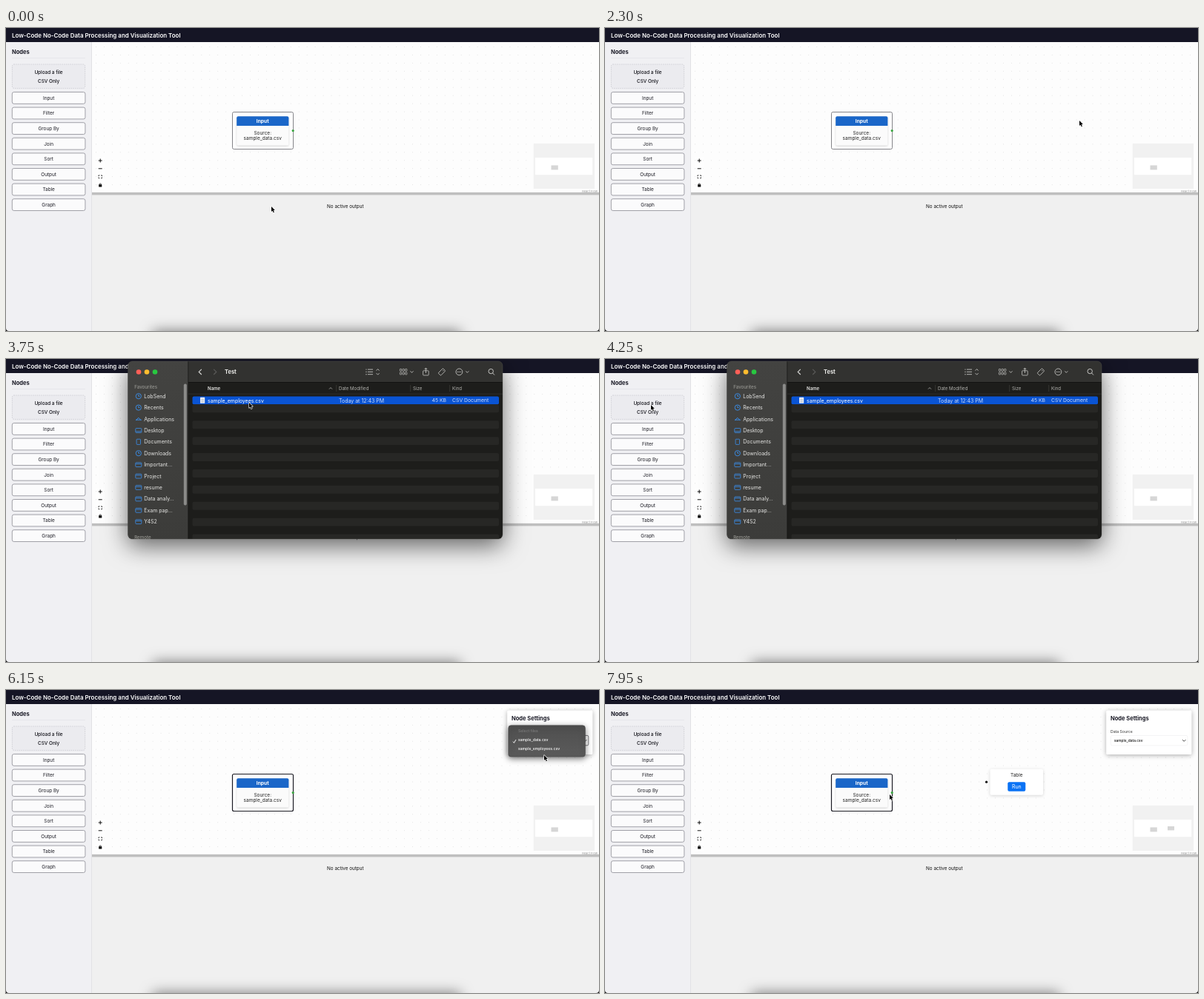
An HTML page with a canvas that plays this animation: 800 by 409 pixels, repeating every 8000 ms.

```html
<!DOCTYPE html>
<html lang="en">
<head>
<meta charset="utf-8">
<title>Data tool</title>
<style>
html, body { margin: 0; width: 100%; height: 100%; overflow: hidden; background: #000; }
canvas { display: block; width: 800px; height: 409px; }
</style>
</head>
<body>
<canvas id="stage"></canvas>
<script>
const W = 800, H = 409, LOOP = 8000, STEP = 50, GLIDE = 350;
const canvas = document.getElementById('stage');
const dpr = window.devicePixelRatio || 1;
canvas.width = Math.round(W * dpr);
canvas.height = Math.round(H * dpr);
const c = canvas.getContext('2d');

const SPOT = {
  rest: [358, 241], node: [352, 148], option: [738, 66], pane: [640, 125],
  dock: [213, 411], file: [328, 59], upload: [62, 62], close: [178, 16],
  below: [368, 167], menuEnd: [726, 88], tableButton: [57, 217],
  drop: [519, 107], handle: [384, 141]
};
// When the pointer sets off, and where to
const MOVES = [
  [0, 'node'], [500, 'option'], [1750, 'pane'], [2700, 'dock'], [3350, 'file'],
  [3850, 'upload'], [4250, 'close'], [4500, 'below'], [4800, 'node'], [5000, 'option'],
  [5750, 'menuEnd'], [6500, 'tableButton'], [7100, 'drop'], [7600, 'handle']
];
const within = (t, a, b) => t >= a && t < b;
const clamp = p => Math.max(0, Math.min(1, p));
const ease = p => p * p * (3 - 2 * p);
const progress = (t, start, span) => ease(clamp((t - start) / span));

function pointer(t) {
  let [x, y] = SPOT.rest;
  MOVES.forEach(([start, name], i) => {
    const next = i + 1 < MOVES.length ? MOVES[i + 1][0] : LOOP;
    const p = progress(t, start, Math.min(GLIDE, next - start));
    x += (SPOT[name][0] - x) * p;
    y += (SPOT[name][1] - y) * p;
  });
  return { x, y };
}

function text(s, x, y, size, color, weight = 400, align = 'left') {
  c.font = `${weight} ${size}px Inter, sans-serif`;
  c.textAlign = align;
  c.fillStyle = color;
  c.fillText(s, x, y + size * 0.36);
}
function rect(x, y, w, h, color) {
  c.fillStyle = color;
  c.fillRect(x, y, w, h);
}
function box(x, y, w, h, r, fill, stroke, lw = 0.8) {
  c.beginPath();
  c.roundRect(x, y, w, h, r);
  if (fill) { c.fillStyle = fill; c.fill(); }
  if (stroke) { c.strokeStyle = stroke; c.lineWidth = lw; c.stroke(); }
}
function disc(x, y, r, fill) {
  c.beginPath();
  c.arc(x, y, r, 0, 7);
  c.fillStyle = fill;
  c.fill();
}
function ring(x, y, r, color, lw = 0.9) {
  c.beginPath();
  c.arc(x, y, r, 0, 7);
  c.strokeStyle = color;
  c.lineWidth = lw;
  c.stroke();
}
function line(color, lw, ...pts) {
  c.beginPath();
  for (let i = 0; i < pts.length; i += 2) c.lineTo(pts[i], pts[i + 1]);
  c.strokeStyle = color;
  c.lineWidth = lw;
  c.stroke();
}
// Chevron with its tip pointing along (dx, dy)
function chevron(x, y, dx, dy, r, color, lw = 0.9) {
  const px = dx * r / 2, py = dy * r / 2;
  line(color, lw, x - px - dy * r, y - py - dx * r, x + px, y + py, x - px + dy * r, y - py + dx * r);
}
function shaded(color, blur, dy, draw) {
  c.save();
  c.shadowColor = color;
  c.shadowBlur = blur * dpr;
  c.shadowOffsetY = dy * dpr;
  draw();
  c.restore();
}
function vertical(y0, y1, a, b) {
  const g = c.createLinearGradient(0, y0, 0, y1);
  g.addColorStop(0, a);
  g.addColorStop(1, b);
  return g;
}

function button(label, x, y) {
  box(x, y, 98.6, 15.8, 2.4, '#fbfbfc', '#8b8b93');
  text(label, x + 49.3, y + 8, 6.4, '#1c1c24', 400, 'center');
}

function sidebar() {
  rect(0, 19, 116, 390, '#f0f0f3');
  rect(115, 19, 1, 390, '#e2e2e5');
  text('Nodes', 8, 32, 7.5, '#1a1a26', 700);
  rect(8, 40.5, 99, 0.6, '#dfdfe4');
  c.setLineDash([1.6, 1.2]);
  box(8.4, 49, 98.2, 32.4, 2.4, '#ebebef', '#c4c4cc', 0.7);
  c.setLineDash([]);
  ['Upload a file', 'CSV Only'].forEach((s, i) =>
    text(s, 57.5, 60 + i * 11.2, 6.4, '#111118', 500, 'center'));
  ['Input', 'Filter', 'Group By', 'Join', 'Sort', 'Output', 'Table', 'Graph']
    .forEach((s, i) => button(s, 8.3, 86.5 + i * 20.6));
}

function controls() {
  const x = 127.2, k = '#111';
  rect(x - 5.2, 174, 10.4, 43.4, '#fefefe');
  for (const y of [179, 189.8]) line(k, 1, x - 2.5, y, x + 2.5, y);
  line(k, 1, x, 176.5, x, 181.5);
  for (const sx of [-1, 1]) for (const sy of [-1, 1]) {
    const ex = x + sx * 2.3, ey = 200.8 + sy * 1.9;
    line(k, 0.8, ex - sx * 1.4, ey, ex, ey, ex, ey - sy * 1.2);
  }
  box(x - 2.1, 211.3, 4.2, 3.3, 0.6, k);
  ring(x, 211.2, 1.3, k, 0.7);
}

function pane() {
  rect(116, 19, 684, 203, '#fdfdfd');
  const gap = 10.95;
  for (let x = 121; x < W; x += gap)
    for (let y = 25; y < 222; y += gap) rect(x, y, 0.9, 0.9, '#dfdfdf');
  controls();
}

function inputNode(bold) {
  const mid = 346.2;
  box(305.5, 113.5, 82, 50, 2, '#fff', bold ? '#1c1c24' : '#77777c', bold ? 1.2 : 0.9);
  shaded('rgba(0,0,0,.18)', 3, 1, () => box(311.2, 119.2, 70.2, 39.4, 2, '#fbfbfb'));
  box(311.2, 119.2, 70.2, 12.8, [2, 2, 0, 0], '#1a66c8');
  text('Input', mid, 126, 6.7, '#fff', 700, 'center');
  text('Source:', mid, 141.6, 6.5, '#222', 400, 'center');
  text('sample_data.csv', mid, 149, 6.5, '#222', 400, 'center');
  disc(387.2, 138.6, 1.6, '#35a23c');
}

function tableNode() {
  const mid = 555.3;
  shaded('rgba(0,0,0,.16)', 4, 1, () => box(519.5, 106.8, 71.5, 35, 2, '#fff'));
  text('Table', mid, 115, 6.4, '#222', 400, 'center');
  box(mid - 12, 124.2, 24, 12.6, 2, '#0a72f4');
  text('Run', mid, 130.5, 7, '#fff', 400, 'center');
  disc(514.6, 124.2, 1.6, '#111');
}

function minimap(hasTable) {
  rect(711.8, 155.8, 82.2, 61.2, '#f1f1f1');
  rect(713.8, 175, 77.4, 23.2, '#fff');
  rect(735.5, 185.4, 9.3, 6, '#d6d6d6');
  if (hasTable) rect(759, 184, 9, 5.4, '#d6d6d6');
  text('React Flow', 798, 220.4, 4, '#999', 400, 'right');
}

function settings(focused) {
  shaded('rgba(0,0,0,.32)', 6, 1.2, () => box(676.2, 27.6, 115.2, 59.4, 1.6, '#fff'));
  text('Node Settings', 682, 38.6, 7.5, '#1a1a26', 700);
  text('Data Source', 682, 56.3, 5.12, '#333');
  box(682.4, 61.4, 103.4, 13.4, 1.6, '#fff', focused ? '#55555c' : '#f1f1f3');
  text('sample_data.csv', 687, 68, 4.8, '#111', 500);
  chevron(781.2, 68.2, 0, 1, 2.2, '#333');
}

function menu(files, mouse) {
  const h = 18.2 + files.length * 12;
  shaded('rgba(0,0,0,.5)', 8, 2.5, () =>
    box(677.8, 47.8, 103.6, h, 3.6, vertical(48, 48 + h, '#4f4f4f', '#5b5b5b'), '#444', 0.6));
  text('Select files', 691, 55, 5.1, '#7d7d7d', 500);
  files.forEach((s, i) => {
    const y = 67 + i * 12;
    if (Math.abs(mouse.y - y - 1) < 6) box(680.4, y - 4.8, 98, 12.4, 2.4, '#3c7df2');
    text(s, 691, y + 0.2, 5.05, '#fff', 500);
  });
  line('#fff', 0.9, 684, 69.6, 685.4, 71.4, 688, 67);
}

function dock(rise) {
  if (rise <= 0) return;
  const dy = (1 - rise) * 32;
  box(197, 395.3 + dy, 32, 32, 7, '#54a9ef');
  box(238, 399.3 + dy, 28, 28, 6, '#ececea');
  disc(285.5, 419.5 + dy, 13, '#35cf3c');
  if (rise < 1) return;
  const x = SPOT.dock[0];
  shaded('rgba(0,0,0,.35)', 5, 1.5, () => {
    box(x - 18.8, 368.6, 37.6, 15.2, 3, '#565656');
    chevron(x, 384.5, 0, 1, 4);
    c.fill();
  });
  text('Browse', x, 376.3, 7.6, '#f2f2f2', 400, 'center');
}

const PLACES = {
  LobSend: 'dial', Recents: 'dial', Applications: 'tools', Desktop: 'screen', Documents: 'page',
  Downloads: 'dial', 'Important...': '', Project: '', resume: '', 'Data analy...': '',
  'Exam pap...': '', Y4S2: ''
};

function placeIcon(kind, x, y) {
  const b = '#3a91f0';
  if (kind === 'dial') {
    ring(x, y, 3.6, b);
    line(b, 0.9, x, y - 2.2, x, y, x + 1.6, y);
  } else if (kind === 'tools') {
    chevron(x, y, 0, -1, 3.4, b, 1);
    line(b, 0.9, x - 3.8, y + 1.2, x + 3.8, y + 1.2);
  } else if (kind === 'page') {
    box(x - 2.7, y - 3.6, 5.4, 7.2, 0.8, null, b);
  } else {
    box(x - 4, y - 2.8, 8, 5.8, 0.9, null, b);
    const bar = y + (kind === 'screen' ? 1.4 : -1);
    line(b, 0.8, x - 3.6, bar, x + 3.6, bar);
  }
}

function toolbar() {
  const k = '#c4c4c2', y = 17.4;
  chevron(262, y, -1, 0, 3.6, '#d8d8d6', 1.1);
  chevron(282, y, 1, 0, 3.6, '#5c5c5a', 1.1);
  text('Test', 295, y, 7.5, '#e8e8e6', 700);
  for (let i = -1; i < 2; i++) {
    const ly = y + i * 3.3;
    disc(486, ly, 0.7, k);
    line(k, 0.9, 488, ly, 495, ly);
    for (const dy of [-4, 0.6]) box(535 + i * 3.6, y + dy, 2.3, 3, 0.5, null, k, 0.7);
    disc(611.4 + i * 2, y, 0.6, k);
  }
  ring(611.4, y, 4.4, k);
  for (const d of [-1, 1]) chevron(501.6, y + d * 2.8, 0, d, 2, k);
  for (const x of [547.5, 622.3]) chevron(x, y, 0, 1, 2, k);
  box(562.6, y - 1.6, 7.6, 6.2, 0.8, null, k);
  line(k, 0.9, 566.4, y + 1.6, 566.4, y - 5.2);
  chevron(566.4, y - 4.4, 0, -1, 1.8, k);
  c.save();
  c.translate(588, y);
  c.rotate(-Math.PI / 4);
  box(-4.6, -2.4, 9, 4.8, 1, null, k);
  disc(2.6, 0, 0.6, k);
  c.restore();
  ring(654.2, y - 0.8, 3.2, k, 1);
  line(k, 1, 656.6, y + 1.6, 659, y + 4.2);
}

function fileIcon(x, y) {
  box(x, y, 6.2, 8, 0.6, '#e8ecf2');
  for (let i = 1; i < 4; i++) line('#9aa4b4', 0.5, x + 1.3, y + 1 + i * 1.7, x + 5, y + 1 + i * 1.7);
}

function fileWindow(selected) {
  const x = 164.5, y = 3, w = 505.5, h = 240, split = 246;
  shaded('rgba(0,0,0,.6)', 32, 9, () => box(x, y, w, h, 6, '#1d1d1b'));
  c.save();
  c.beginPath();
  c.roundRect(x, y, w, h, 6);
  c.clip();
  rect(x, y, split - x, h, vertical(y, y + h, '#434341', '#3c3c3a'));
  rect(split, y, w, 28, '#323230');
  rect(split, 31, w, 0.6, '#0d0d0c');
  rect(split - 0.5, y, 0.7, h, '#111');
  ['#ff5f57', '#febc2e', '#28c840'].forEach((f, i) => disc(179 + i * 11, 17.5, 3.3, f));
  toolbar();

  text('Favourites', 173.2, 38.2, 6.2, '#94948f', 500);
  Object.entries(PLACES).forEach(([s, kind], i) => {
    const cy = 50.2 + i * 15.4;
    placeIcon(kind, 178.8, cy);
    text(s, 186.2, cy, 7, '#e6e6e4');
  });
  text('Remote', 173.2, 240.6, 6.2, '#94948f', 500);
  box(239.8, 33.6, 4, 163.8, 2, '#8b8b89');

  const head = '#b4b4b0', row = 10.95, columns = { 'Date Modified': 449, Size: 549, Kind: 602 };
  text('Name', 272, 39.6, 6.1, '#e6e6e4', 600);
  chevron(438, 39.6, 0, -1, 2, head, 0.8);
  for (const [s, cx] of Object.entries(columns)) {
    text(s, cx, 39.6, 6.1, head);
    rect(cx - 3.5, 35, 0.6, 9, '#444441');
  }
  rect(split, 46.8, w, 0.6, '#3b3b38');
  for (let i = 0; i < 18; i++) {
    const fill = i % 2 ? '#272725' : i === 0 && selected ? '#0a54d4' : null;
    box(251.5, 50.4 + i * row, 413.5, row, 2, fill);
  }
  fileIcon(262, 51.8);
  const soft = selected ? '#cfdcf8' : head;
  text('sample_employees.csv', 272, 56, 6.95, '#fff');
  text('Today at 12:43 PM', columns['Date Modified'], 56, 7, soft);
  text('45 KB', 594, 56, 6.85, soft, 400, 'right');
  text('CSV Document', columns.Kind, 56, 6.85, soft);
  c.restore();
  box(x, y, w, h, 6, null, 'rgba(90,90,88,.6)', 0.6);
}

function dragGhost(t, { x, y }) {
  c.save();
  c.globalAlpha = 0.6;
  if (within(t, 3850, 4250)) {
    fileIcon(x - 66, y - 7);
    text('sample_employees.csv', x - 56, y - 3, 6.95, '#777');
  }
  if (within(t, 7100, 7600)) button('Table', x - 49, y - 7);
  c.restore();
}

function arrow({ x, y }) {
  c.save();
  c.translate(x, y);
  c.lineJoin = 'round';
  const shape = new Path2D('M0 0V7L1.6 5.6L2.7 8.2L3.9 7.7L2.8 5.1L4.9 5Z');
  c.strokeStyle = '#fff';
  c.lineWidth = 1.2;
  c.stroke(shape);
  c.fillStyle = '#000';
  c.fill(shape);
  c.restore();
}

function draw(t) {
  const m = pointer(t);
  const hasTable = t >= 7600, chosen = t >= 4950;
  c.setTransform(dpr, 0, 0, dpr, 0, 0);
  rect(0, 0, W, H, '#111');
  c.save();
  c.beginPath();
  c.roundRect(0, 0, W, H, [0, 0, 4, 4]);
  c.clip();

  pane();
  inputNode(chosen);
  if (hasTable) tableNode();
  minimap(hasTable);
  rect(116, 225, 684, 184, '#f0f0f0');
  rect(116, 221.8, 684, 3.6, '#bfbfbf');
  text('No active output', 457.8, 241, 6.35, '#111', 400, 'center');
  sidebar();
  rect(0, 0, W, 19, '#151525');
  text('Low-Code No-Code Data Processing and Visualization Tool', 8, 9.7, 7.95, '#fff', 600);

  if (chosen || within(t, 350, 2100))
    settings(within(t, 1000, 2100) || within(t, 5550, 6850));
  if (within(t, 1000, 1750)) menu(['sample_data.csv'], m);
  if (within(t, 5550, 6250)) menu(['sample_data.csv', 'sample_employees.csv'], m);

  shaded('rgba(0,0,0,.5)', 18, 0, () => rect(198, 409, 415, 20, '#555'));
  if (within(t, 3400, 4500)) fileWindow(t >= 3700);
  dock(progress(t, 3000, 200) - progress(t, 3300, 150));
  dragGhost(t, m);
  arrow(m);
  c.restore();
}

function tick(now) {
  draw(Math.floor((now % LOOP) / STEP) * STEP);
  requestAnimationFrame(tick);
}
draw(0);
requestAnimationFrame(tick);
</script>
</body>
</html>
```
